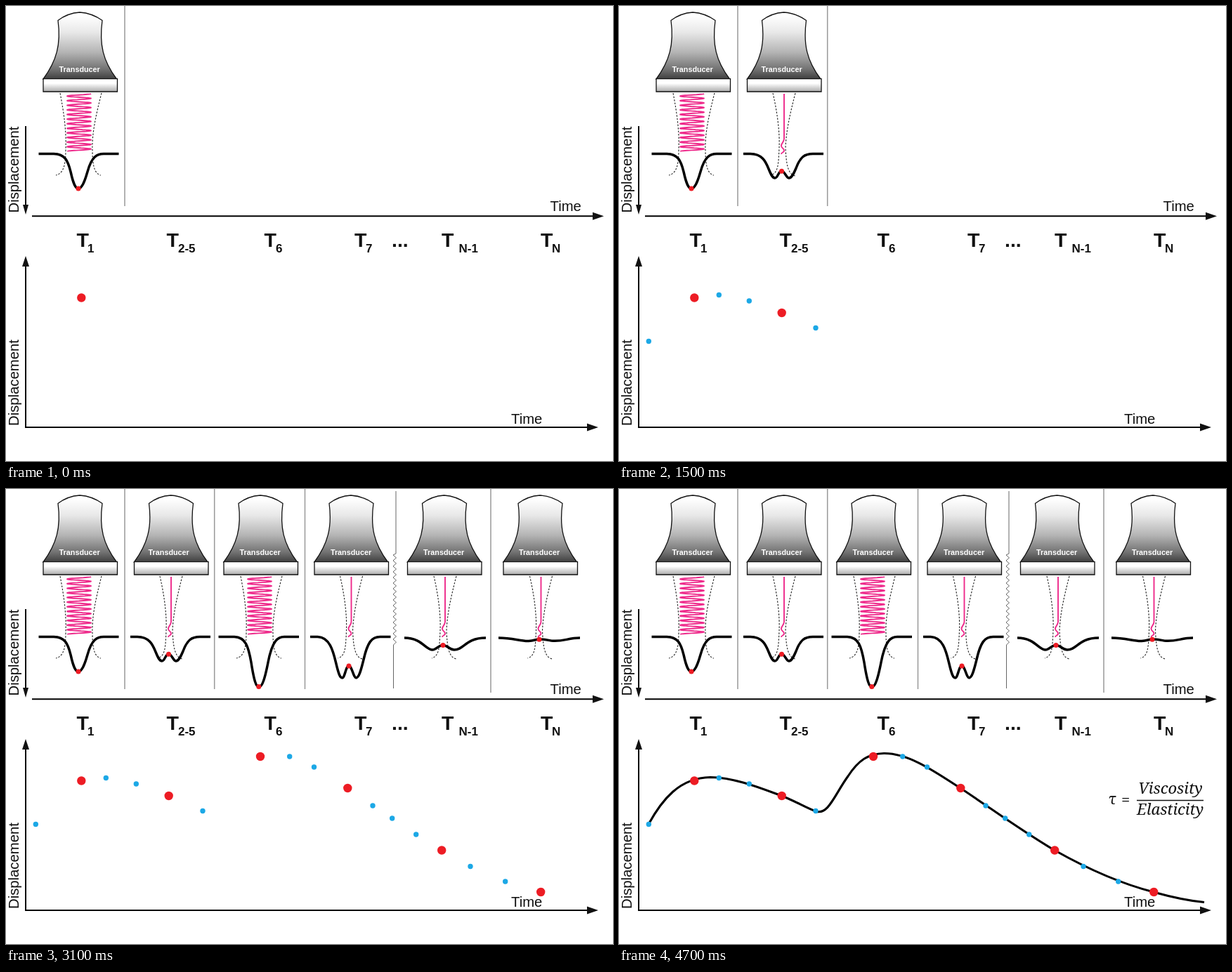
Write an HTML page that moves like this. It is 864x648 px and loops after 5.5 s.

```html
<!DOCTYPE html>
<html lang="en">
<head>
<meta charset="utf-8">
<title>Displacement over time</title>
<style>
  html, body { margin: 0; width: 100%; height: 100%; overflow: hidden; background: #fff; }
  svg { display: block; width: 864px; height: 648px; font: 20.3px "Liberation Sans", Arial, sans-serif; fill: #111; }
  .line { fill: none; stroke: #000; stroke-width: 2; }
  .trace { fill: none; stroke: #000; stroke-width: 3.5; }
  .curve { fill: none; stroke: #000; stroke-width: 3.1; }
  .beam { fill: none; stroke: #ee2a8b; stroke-width: 1.9; stroke-linejoin: round; }
  .edge { fill: none; stroke: #222; stroke-width: 1.1; stroke-dasharray: 2.5 2; }
  .split { fill: none; stroke: #999; stroke-width: 1.5; }
  .jag { fill: none; stroke: #666; stroke-width: 1; }
  .probe { stroke: #111; stroke-width: 1.3; }
  .name { font-size: 10.8px; font-weight: bold; fill: #fff; text-anchor: middle; }
  .tick { font-size: 28.5px; font-weight: bold; }
  .sub { font-size: 17px; font-weight: bold; }
  .math { font: 22px "Noto Serif", "Liberation Serif", serif; }
  .it { font-style: italic; }
  .red { fill: #ed1c24; }
  .blue { fill: #1ca8e6; }
</style>
</head>
<body>
<svg id="stage" viewBox="0 0 864 648">
  <defs>
    <linearGradient id="body" x2="0" y2="1">
      <stop offset=".05" stop-color="#fff"/>
      <stop offset=".3" stop-color="#e8e8e8"/>
      <stop offset=".6" stop-color="#b4b4b4"/>
      <stop offset=".85" stop-color="#737373"/>
      <stop offset="1" stop-color="#404040"/>
    </linearGradient>
    <linearGradient id="foot" x2="0" y2="1">
      <stop offset=".35" stop-color="#fff"/>
      <stop offset="1" stop-color="#aaa"/>
    </linearGradient>
    <g id="probe" class="probe">
      <path fill="url(#body)" d="M74 20.5Q88 10 105 9Q122 10 137 20.5C132.5 55 138 78 157.5 104H53C72 78 78.5 55 74 20.5Z"/>
      <path fill="url(#foot)" d="M53 103.7H158.5V122H53Z"/>
    </g>
    <g id="wide">
      <path class="edge" d="M77 124C83 155 86 180 85 203C85 224 83 238 71 241M136 124C128 155 122 183 123 205C123 224 125 239 135 241"/>
      <path class="beam" id="coil"/>
    </g>
    <g id="thin">
      <path class="edge" d="M219 124C225 150 229 178 228 202C227 224 227 238 216 241M251 124C243 155 238 178 237 202C238 224 240 240 251 242"/>
      <path class="beam" d="M235 125V189C235 194 231 195 231 199C231 203 235 202 235 206C235 209 231 208 231 211"/>
    </g>
  </defs>

  <path class="line" d="M37 299.3H840M28 171V287M28 366V600H832"/>
  <path d="M851 299.3L835 293.8V304.8ZM28 297L24 283H32ZM28 356L23 371H33ZM843 600L827 594.5V605.5Z"/>
  <text transform="translate(18 294.5) rotate(-90)">Displacement</text>
  <text transform="translate(18 598) rotate(-90)">Displacement</text>
  <text x="774.5" y="291.5">Time</text>
  <g id="ticks"></g>

  <g data-at="3500">
    <path class="curve" d="M42 477.5C61 443 86 411 130 410.5C166 411 204 427 231.5 437C252 445 266 454 280 459C298 465 307 435 326 409C341 386 355 377 377 376.5C412 376 449 402 486 426C530 455 573 487 620 514.5C667 541 714 562 761 574C786 581 808 586 833 588.5"/>
    <g class="math">
      <text x="697" y="449">τ</text>
      <text x="715" y="450">=</text>
      <text class="it" x="739" y="434">Viscosity</text>
      <text class="it" x="737" y="464">Elasticity</text>
      <path d="M737 442.8H832V444.3H737Z"/>
    </g>
  </g>
  <text x="719" y="595">Time</text>

  <g data-at="0" id="first"><path class="split" d="M169 0V285"/></g>
  <g data-at="1500" id="second"><path class="split" d="M296.7 0V285"/></g>
  <g data-at="2500" id="rest">
    <path class="split" d="M425.5 0V285M690 0V290"/>
    <path class="jag" id="jag"/>
  </g>
</svg>
<script>
const LOOP = 5500;
const $ = id => document.getElementById(id);
const add = (id, markup) => $(id).insertAdjacentHTML("beforeend", markup);
const dot = (kind, r) => ([x, y]) => `<circle class="${kind}" cx="${x}" cy="${y}" r="${r}"/>`;

// Coil: a squeezed cosine running down the beam
let coil = "M121 125";
for (let a = 0; a <= 25 * Math.PI; a += 0.2)
  coil += `L${(104 + 17 * Math.cos(a)).toFixed(1)} ${(125 + a * 1.044).toFixed(1)}`;
$("coil").setAttribute("d", coil);

let jag = "M555 3V92";
for (let i = 0; i < 32; i++) jag += `L${(i % 2 ? 555.5 : 551)} ${94 + i * 4}`;
$("jag").setAttribute("d", jag + "L551.5 222V284");

// Time labels: x of the T, x of the subscript, subscript
[[100.5, 116, "1"], [228.5, 245, "2-5"], [367.5, 384, "6"], [496, 512, "7"],
 [620, 644.5, "N-1"], [761, 777, "N"]].forEach(([x, sx, sub]) =>
  add("ticks", `<text class="tick" x="${x}" y="342.5">T</text><text class="sub" x="${sx}" y="351">${sub}</text>`));
add("ticks", '<text class="tick" x="549" y="342.5">...</text>');

// Panels: group, probe shift, name centre, beam, beam shift, tissue curve, its middle point
const panels = [
  ["first", 0, 104.7, "wide", 0,
   "M46.5 210.5H68C84 211 88 220 92 236C96 254 99 260 103 260C108 260 112 250 116 236C122 214 130 210.5 139 210.5H160.5", [103, 260]],
  ["second", 129.5, 231.7, "thin", 0,
   "M177 210.5H187C204 210.5 209 222 213 232C217 242 219 245 222 245C226 245 227 235 231.5 235C236 235 238 245 242 245C246 245 249 238 252 231C258 215 264 210.5 276 210.5H291", [231.5, 235.3]],
  ["rest", 257, 361.7, "wide", 257,
   "M302.5 210.5H325C341 211 345 224 349 247C353 273 356 282 360 282C365 282 369 267.5 373 247C379 215.5 387 210.5 396 210.5H417", [359.8, 281.5]],
  ["rest", 386, 491, "thin", 256.5,
   "M433 210.5H443.5C460.5 211 465.5 230 469.5 247C473.5 264 475.5 269 478.5 269C482.5 269 483.5 252 488 252C492.5 252 494.5 269 498.5 269C502.5 269 505.5 257 508.5 245C514.5 218 520.5 210.5 532.5 210.5H547.5", [488, 252]],
  ["rest", 518.5, 623.2, "thin", 390,
   "M567 212C592 212 597 229 607 229C613 229 615 222.5 622 222.5C629 222.5 631 229 638 229C652 229 654 212 683 212", [622, 222.5]],
  ["rest", 655, 759, "thin", 526.5,
   "M701 212C722 212 732 217 744 216.5C752 216 754 214 759 214C765 214 770 215 776 216C792 218 800 212 817 212", [759, 214.3]]
];
for (const [group, dx, nameX, beam, beamX, curve, mid] of panels)
  add(group, `<use href="#probe" x="${dx}"/><text class="name" x="${nameX}" y="93.5">Transducer</text>
    <use href="#${beam}" x="${beamX}"/><path class="trace" d="${curve}"/>${dot("red", 3.5)(mid)}`);

// Plotted samples
const plot = (group, blue, red) =>
  add(group, blue.map(dot("blue", 3.7)).join("") + red.map(dot("red", 6.2)).join(""));
plot("first", [], [[107.3, 415.5]]);
plot("second", [[42.3, 477.5], [142.3, 411.5], [185.3, 420], [280, 458.5]], [[231.7, 437]]);
plot("rest",
  [[403.7, 381], [438.5, 396], [522, 451], [549.7, 469], [583.7, 492], [661, 537.5], [710.7, 559]],
  [[362, 381], [486.3, 426], [620.2, 514.5], [761.2, 574]]);

const stages = [...document.querySelectorAll("[data-at]")];
let start;
function draw(now) {
  start ??= now;
  const t = Math.max(0, now - start) % LOOP;
  for (const s of stages) s.style.display = t >= +s.dataset.at ? "" : "none";
  requestAnimationFrame(draw);
}
draw(performance.now());
</script>
</body>
</html>
```
